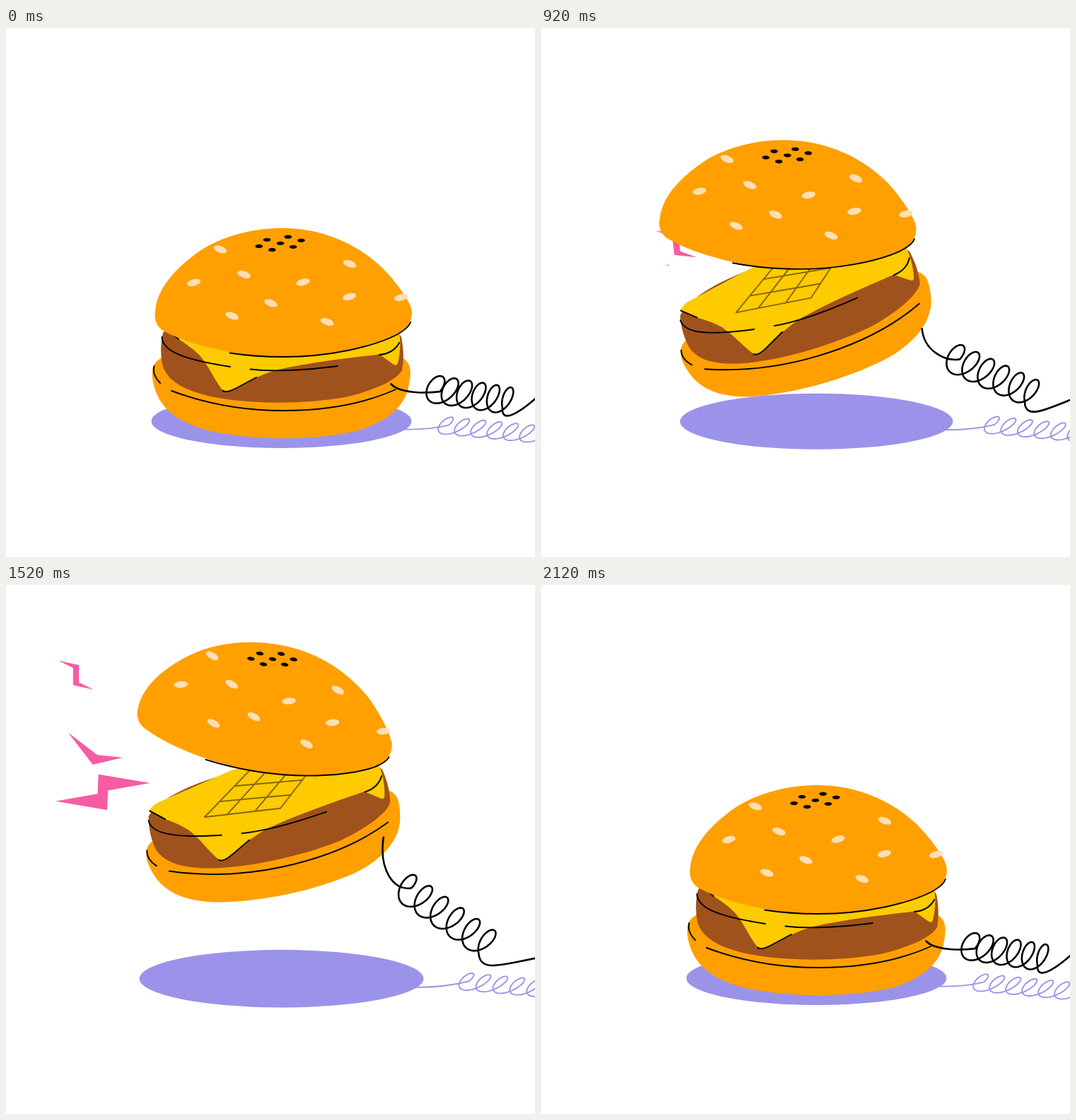
These frames come from a looping animation (748x748 px, 2.84 s). An HTML page:

```html
<!DOCTYPE html>
<html lang="en">
<head>
<meta charset="utf-8">
<title>Burger phone</title>
<style>
  html, body { margin: 0; width: 100%; height: 100%; overflow: hidden; background: #fff; }
  svg { display: block; width: 100%; height: 100%; }
  .line { fill: none; stroke: #000; stroke-width: 1.9; stroke-linecap: round; stroke-linejoin: round; }
  .bread { fill: #ffa000; }
  .patty { fill: #a0521c; }
  .cheese { fill: #fdcb00; }
  .bolt { fill: #f85ba3; }
  #shadow { fill: #9b93e9; }
  #grid { stroke: #85660a; }
  #cord { stroke-width: 2.6; }
  #cordShade { stroke: #9b93e9; }
  #seeds { fill: #ffdeb4; }
</style>
</head>
<body>
<svg viewBox="0 0 748 748">
  <ellipse id="shadow" cx="389.5"/>
  <path id="cordShade" class="line"/>
  <g id="bolts">
    <path class="bolt"/>
    <path class="bolt"/>
    <path class="bolt"/>
  </g>
  <g id="base">
    <path class="bread" d="M219 467C205 474 205 490 209 505C217 537 241 557 285 569C350 583.500 430 583.500 490 571C535 560 561 538 568.500 511C572 495 573 485 570 477C568 472 565 469 561 467Z"/>
    <path class="line" d="M209.500 478C207 487 210 494 218 502M234 513C285 532 340 541 392 541S500 534 551 511"/>
    <path class="patty" d="M222 431C236 414 280 399 345 396L500 405C535 412 552 425 559 437C562 452 563 468 560 484C553 497 525 511 480 522C420 532.500 340 532.500 285 520C250 511 232 500 223 482C218 468 218 445 222 431Z"/>
    <path class="cheese" d="M225 424C227 420 232 417 238 415L352 392C420 392 500 404 540 416Q552 420 556 429C558 445 558 458 554 474Q552 479 547 475L528 461.500C480 467 430 473 385 483Q370 487 354 494.500L326 509.500Q311 517.500 306 512C293 495 288 480 274 463Q262 451 244 440Z"/>
    <path id="grid" class="line" d="M299 449L406.500 459.500M325 432L425 444M350 415L446 427M375 398L464 411M299 449L375 398M332.500 451L405 399M370 456L436 405M406.500 459.500L464 411"/>
    <path class="line" d="M225 424L244 440M220.500 437C221 455 245 468 317 479M345.500 482.500C385 487 430 483 469 478M306 512.500Q311 517 326 509L354 494M528 462C543 461 552 453 556 445"/>
  </g>
  <path id="cord" class="line"/>
  <g id="bun">
    <path class="bread" d="M392 283C446 283 496 305 531 338C550 357 569 383 573 396C577 412 568 426 552 434C520 450 460 465 392 465C342 465 270 453 226 430C213 424 209 412 211 400C214 366 243 338 270 318C306 293 350 283 392 283Z"/>
    <path class="line" d="M316.500 459.500C342 463.500 367 465 392 465C460 465 520 450 552 434C563 428 570 422 572 416"/>
    <g id="seeds"></g>
    <g id="holes"></g>
  </g>
</svg>
<script>
const LOOP = 2840, STEP = 40, RAD = Math.PI / 180;
const $ = id => document.getElementById(id);
const mix = (a, b, k) => a + (b - a) * k;
const span = (t, a, b) => Math.min(1, Math.max(0, (t - a) / (b - a)));
const smooth = s => s * s * (3 - 2 * s);
const cubic = s => s < .5 ? 4 * s ** 3 : 1 - 4 * (1 - s) ** 3;
// Rises from a to b, falls back from c to d.
const pulse = (t, ease, a, b, c, d) => ease(span(t, a, b)) - ease(span(t, c, d));

function set(el, attrs) {
  for (const k in attrs) el.setAttribute(k, attrs[k]);
}

function oval(id, cx, cy, rx, ry, turn) {
  const el = document.createElementNS('http://www.w3.org/2000/svg', 'ellipse');
  set(el, { cx, cy, rx, ry, transform: `rotate(${turn} ${cx} ${cy})` });
  $(id).append(el);
}

const seed = turn => ([x, y]) => oval('seeds', x, y, 9.8, 4.7, turn);
[[303, 313], [336.5, 348.5], [486, 333.5], [374.5, 389], [319.5, 407], [454, 415.5]].forEach(seed(20));
[[265.5, 360], [420, 359.5], [485.5, 380], [558.5, 381]].forEach(seed(-14));

// One hole in the middle, six on a slanted ring.
oval('holes', 388, 304.5, 5.3, 2.6, 0);
for (let a = 0; a < 360; a += 60) {
  const c = Math.cos(a * RAD), s = Math.sin(a * RAD);
  oval('holes', 387.5 + 29.8 * c + 4.2 * s, 304.5 - 4.2 * c + 8.2 * s, 5.3, 2.6, 0);
}

// A zigzag is point-symmetric: half of its corners give the rest.
const zigzag = half => `M${half.join(' ')} ${half.map(v => -v).join(' ')}Z`;

// Each bolt leaves the mouth along a curve, swelling and shrinking over its life.
const bolts = [
  { born: 770, life: 890, size: 1, x: [27, -32, -130], y: [-23, 39, -143],
    d: zigzag([-59, -35, 4, -31, 12, 20]) },
  { born: 900, life: 900, size: 1.25, x: [-5, -25, -132], y: [20, 32, 6],
    d: 'M-40-22L4 2 39 0 0 16Z' },
  { born: 1020, life: 1000, size: 1, x: [29, -89, -100], y: [67, 68, 92],
    d: zigzag([-64, 23, -7, 3.5, -10, -24]) }
];
const boltEls = [...$('bolts').children];
bolts.forEach((b, i) => set(boltEls[i], { d: b.d }));

const curve = ([a, b, c], s) => mix(mix(a, b, s), mix(b, c, s), s);

function drawBolt(b, el, t, mouth, turn) {
  const s = span(t, b.born, b.born + b.life);
  const x = mouth.x + curve(b.x, s), y = mouth.y + curve(b.y, s);
  const size = s % 1 && b.size * Math.sin(Math.PI * s);
  set(el, { transform: `translate(${x} ${y}) rotate(${turn}) scale(${size})` });
}

// Lead from the plug, then a coil: a slanted ellipse that drifts along.
function cordPath(p, rx, ry, slant, turns) {
  const [x, y, x1, y1, x2, y2, cx, cy, dx, dy, narrow] = p;
  const pts = [];
  for (let a = -40; a <= turns * 360 - 170; a += 8) {
    const k = a / 360;
    pts.push([cx + dx * k + (rx - narrow * k) * Math.cos(a * RAD),
              cy + dy * k - ry * Math.sin((a + slant) * RAD)].map(v => v.toFixed(2)).join(' '));
  }
  return `M${x} ${y}C${x1} ${y1} ${x2} ${y2} ${pts.join('L')}`;
}

// Order: plug, two handles, coil centre, drift per turn, narrowing per turn.
const CORD = [[544.5, 503.5, 558, 518, 598, 516, 602, 510, 20.4, 3.2, 1],
              [533, 347, 525, 395, 545, 428, 559.5, 420, 22.6, 16.4, 0]];
const SHADE = [[564, 567.5, 585, 568, 608, 566, 616, 561.5, 23, 2.2, 0],
               [581, 569, 605, 569, 630, 567, 647, 560, 24, 2.2, 0]];
const TAIL = [[700, 560, 725, 545, 752, 521], [668, 548, 700, 536, 752, 527.5]];
const blend = ([a, b], k) => a.map((v, i) => mix(v, b[i], k));

function place(id, x, y, turn, cx, cy) {
  set($(id), { transform: `translate(${x} ${y}) rotate(${turn} ${cx} ${cy})` });
}

function draw(t) {
  const rise = at => pulse(at, cubic, 520, 1320, 1320, 2120);
  const up = rise(t);
  const lift = 150 * rise(t - 4) + 13 * up * (1 - up);
  const open = pulse(t, cubic, 440, 1128, 1600, 2120);
  const turn = 2.15 * pulse(t, smooth, 440, 920, 920, 1200) + 8.9 * pulse(t, smooth, 1200, 1520, 1520, 1845);

  place('base', .5 * turn - 11.5 * open, -lift, turn - 21.1 * open, 392.5, 512);
  const bunX = 3.95 * turn - 57 * open, bunY = -lift - 53 * open - .56 * turn;
  place('bun', bunX, bunY, turn, 392, 374);

  const c = Math.cos(turn * RAD), s = Math.sin(turn * RAD);
  const mouth = { x: 392 + bunX - 162 * c - 71 * s, y: 374 + bunY - 162 * s + 71 * c };
  bolts.forEach((b, i) => drawBolt(b, boltEls[i], t, mouth, turn));

  set($('shadow'), { cy: mix(556, 556.7, up), rx: mix(184, 202, up), ry: mix(38, 41, up) });
  set($('cord'), { d: cordPath(blend(CORD, up), 18, 18.5, 26, 6) + 'C' + blend(TAIL, up).join(' ') });
  set($('cordShade'), { d: cordPath(blend(SHADE, up), 16, 11.5, 38, 7) });
}

const start = performance.now();
function tick() {
  const t = (performance.now() - start) % LOOP;
  draw(Math.floor(t / STEP) * STEP);
  requestAnimationFrame(tick);
}
tick();
</script>
</body>
</html>
```
